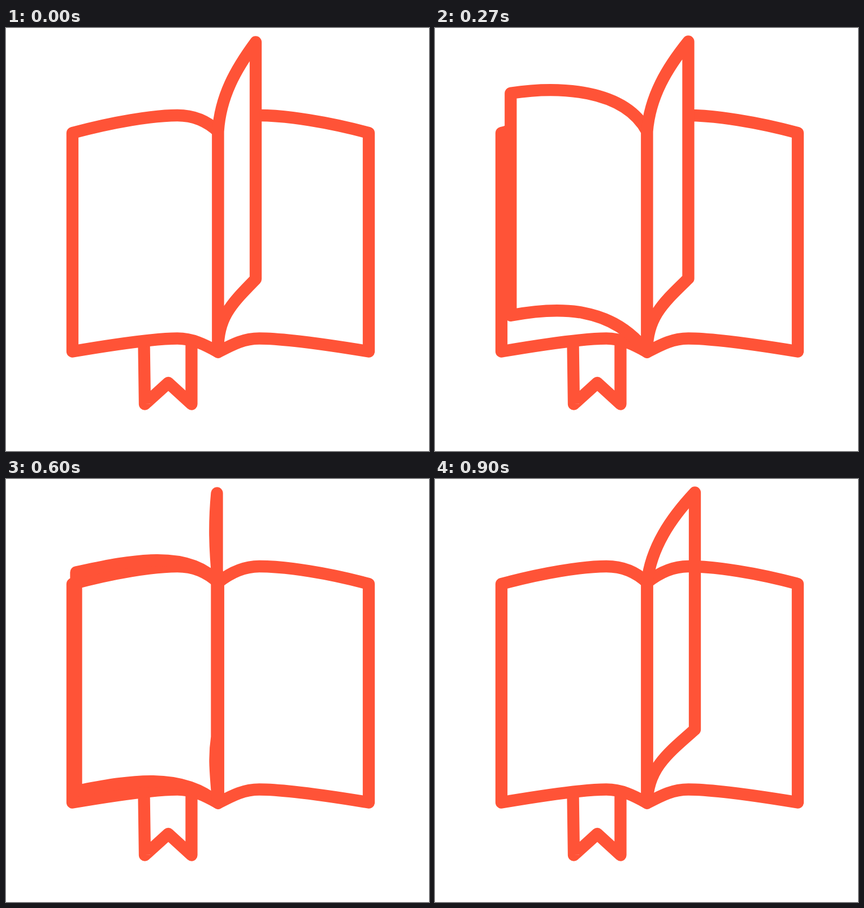
These frames come from a looping animation (748x748 px, 1230 ms). An HTML page:

```html
<!DOCTYPE html>
<html lang="en">
<head>
<meta charset="utf-8">
<title>Turning pages</title>
<style>
  html, body { margin: 0; width: 100%; height: 100%; overflow: hidden; background: #fff; }
  svg { display: block; width: 100vw; height: 100vh; }
  path { fill: none; stroke: #ff5337; stroke-width: 21.3; stroke-linecap: round; stroke-linejoin: round; }
</style>
</head>
<body>
<svg viewBox="0 0 748 748">
  <path d="M244 558L245.5 665L287 627.5L328 665V558"/>
  <path d="M375 183C355 164 330 154.5 303 154.5C260 154.5 190 166 117.5 185.5V572C200 558 270 549 303 549C330 549 352 560 375 573
           C400 560 420 549 448 549C480 549 550 557 641.5 572V185.5C570 166 495 154.5 448 154.5C425 154.5 400 163 375 183V573"/>
  <g id="pages"></g>
</svg>
<script>
const LOOP = 1230, STEP = 30, LAST = 900, CLEAR = 570;
const SPINE = 375, TOP = 183, BOTTOM = 573;
const CENTRE = 379.5, REACH = 262, RAISED = 24, DROP = 161.5;
// When each page starts; the last one continues as the first of the next loop
const STARTS = [-238, 45, 290, 695];

// Path of the free corners: time, x, top y, bottom y
const KEYS = [
  [0, 641.5, 185.5, 572],
  [135, 586, 67, 473],
  [205, 459.5, 24, 443],
  [238, 441.5, 25, 444],
  [310, 373, 25, 456],
  [418, 252, 47, 470],
  [465, 167, 70, 474],
  [555, 124, 165, 552],
  [600, 117.5, 185.5, 572]
];
const TURN = KEYS[KEYS.length - 1][0];

// Speed of one coordinate at a key; the page rests at both ends
function speed(k, col) {
  if (k === 0 || k === KEYS.length - 1) return 0;
  const [a, b, c] = [KEYS[k - 1], KEYS[k], KEYS[k + 1]];
  const h0 = b[0] - a[0], h1 = c[0] - b[0];
  return ((b[col] - a[col]) / h0 * h1 + (c[col] - b[col]) / h1 * h0) / (h0 + h1);
}

function cornersAt(u) {
  const k = KEYS.findIndex(key => key[0] > u) - 1;
  const a = KEYS[k], b = KEYS[k + 1], h = b[0] - a[0];
  const s = (u - a[0]) / h, r = 1 - s;
  return [1, 2, 3].map(col =>
    a[col] * (1 + 2 * s) * r * r + b[col] * s * s * (3 - 2 * s)
    + h * s * r * (speed(k, col) * r - speed(k + 1, col) * s));
}

// The bend of the paper follows from how far open and how high the page is
function pagePath(u) {
  if (u <= 0 || u >= TURN) return "";
  const [x, top, bottom] = cornersAt(u);
  const side = (x - CENTRE) / REACH, open = Math.abs(side), flat = open * open;
  const rest = (top - RAISED) / DROP, arch = rest * (1 - rest);
  const along = part => SPINE + (x - SPINE) * part - 6 * (1 - open);

  const topOuter = [along(0.5 + 0.16 * open), top + 52 - 74 * flat];
  const topInner = [along(0.13 + 0.11 * rest * rest), 121 + 9 * rest - 76 * arch];
  const lowOuter = [along(0.4 + 0.27 * open), bottom + 33 - 49 * flat + 50 * side * (1 - flat)];
  const lowInner = [along(-0.04 + 0.32 * open), 508 + 22 * rest - 100 * arch + 14 * side * (1 - rest)];

  return `M${x} ${top}C${topOuter} ${topInner} ${SPINE} ${TOP}V${BOTTOM}` +
    `C${lowInner} ${lowOuter} ${x} ${bottom}Z`;
}

const group = document.getElementById("pages");
const pages = STARTS.map(() =>
  group.appendChild(document.createElementNS("http://www.w3.org/2000/svg", "path")));

function draw(time) {
  const t = Math.min(LAST, Math.floor((time % LOOP + 0.5) / STEP) * STEP);
  // Pages are opaque first, then see-through
  group.style.fill = t < CLEAR ? "#fff" : "none";
  pages.forEach((page, i) => {
    page.setAttribute("d", pagePath(t - STARTS[i]));
    page.style.fill = "inherit";
  });
}

const start = performance.now();
function tick() {
  draw(performance.now() - start);
  requestAnimationFrame(tick);
}
tick();
</script>
</body>
</html>
```
